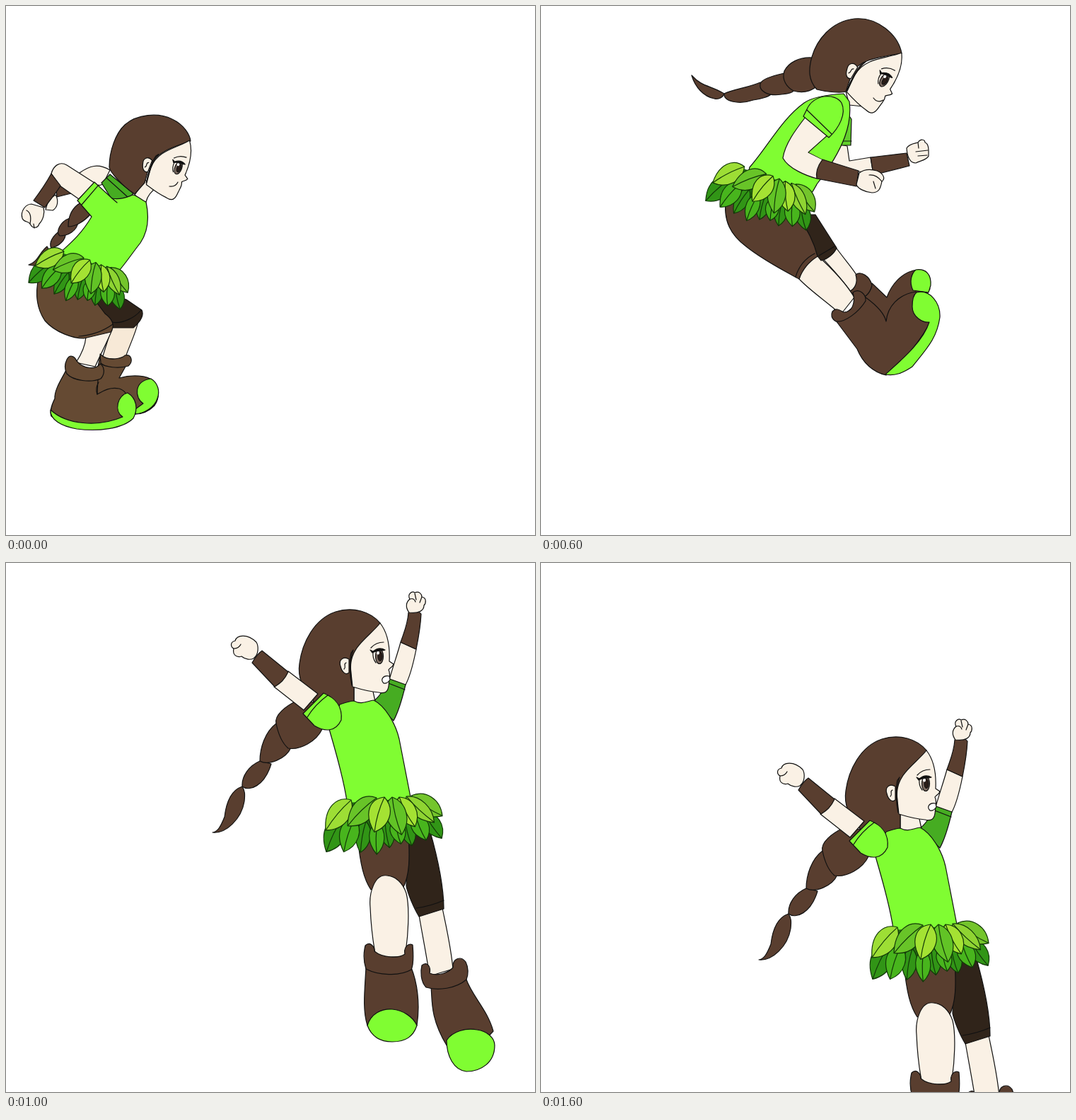
An HTML page without scripts that plays this animation: 748 by 748 pixels, repeating every 1800 ms.

```html
<!DOCTYPE html>
<html lang="en">
<head>
<meta charset="utf-8">
<title>Long jump</title>
<style>
html,body{margin:0;width:100%;height:100%;overflow:hidden;background:#fff}
svg{display:block;width:100%;height:100%;fill:#593e2f;stroke:#111;stroke-width:1.2;stroke-linejoin:round;stroke-linecap:round}
path,ellipse{vector-effect:non-scaling-stroke}
.green{fill:#80fd32}
.shade{fill:#46ac22}
.skin{fill:#faf1e5}
.far{fill:#f7e9d7}
.dark{fill:#30241a}
.tan{fill:#654a33}
.white{fill:#fff}
.line{fill:none}
.pose{visibility:hidden;animation:show 1.8s calc(var(--step)*.2s) step-end infinite}
.fall{visibility:hidden;animation:fall 1.8s 1s step-end infinite}
@keyframes show{0%{visibility:visible}11.111%,100%{visibility:hidden}}
@keyframes fall{
0%{visibility:visible;transform:translate(11px,-73px)}
11.111%{visibility:visible;transform:none}
22.222%{visibility:visible;transform:translate(10px,24px)}
33.333%{visibility:visible;transform:translate(27px,107px)}
44.444%,100%{visibility:hidden}
}
</style>
</head>
<body>
<svg viewBox="0 0 748 748">
<defs>
<g id="face">
<path class="skin" d="M518 158C529 172 532 192 531 212L537 216C536 220 532 221 530 224C533 230 531 234 531 238C530 243 531 249 528 253C526 257 521 257 516 256C503 255 492 252 479 248L476 220C477 190 502 178 518 158Z"/>
<path class="skin" d="M474 209C465 204 459 211 462 219C464 228 470 232 474 228Z"/>
<path class="line" d="M470 214C465 216 471 219 467 223"/>
<path d="M480 196C475 208 476 232 478 246C475 232 474 212 477 200Z"/>
<path class="line" d="M505 193Q512 185 523 185M508 199Q507 208 512 214"/>
<ellipse cx="517" cy="205" rx="5.5" ry="10.5" fill="#7d6c62"/>
<ellipse cx="518" cy="205" rx="3" ry="6.5" fill="#2a1d18"/>
<ellipse class="white" cx="515" cy="200" rx="2" ry="2.5" stroke="none"/>
<path fill="#111" d="M504 196L508 198C514 193 520 193 525 196C520 198 513 196 507 200Z"/>
</g>
<g id="leaf"><path d="M0 0C-20 8-22 30 0 50C19 36 20 12 0 0Z"/><path class="line" d="M0 1Q-4 24 0 49"/></g>
<!-- centred on the origin -->
<g id="skirt" stroke="#123808"><g transform="translate(-522 -442)">
<path fill="#246f12" stroke="none" d="M472 412L570 405L597 445L545 463L512 470L455 462Z"/>
<g fill="#319516">
<use href="#leaf" transform="translate(466 432)rotate(26)scale(1 1.1)"/>
<use href="#leaf" transform="translate(498 438)rotate(10)scale(.7 .9)"/>
<use href="#leaf" transform="translate(525 436)rotate(-9)scale(.7 .8)"/>
<use href="#leaf" transform="translate(553 434)rotate(-14)scale(.7 .8)"/>
<use href="#leaf" transform="translate(580 425)rotate(-34)scale(.8 .9)"/>
</g>
<g fill="#48b51d">
<use href="#leaf" transform="translate(482 434)rotate(18)scale(.9 1)"/>
<use href="#leaf" transform="translate(514 440)rotate(1)scale(.7 .9)"/>
<use href="#leaf" transform="translate(540 436)rotate(-12)scale(.7)"/>
<use href="#leaf" transform="translate(568 428)rotate(-22)scale(.8)"/>
</g>
<use href="#leaf" fill="#9dde35" transform="translate(477 408)rotate(40)scale(1 1.12)"/>
<use href="#leaf" fill="#74c52c" transform="translate(562 402)rotate(-57)scale(.95 1.05)"/>
<use href="#leaf" fill="#8fd432" transform="translate(555 403)rotate(-47)scale(.75 1.08)"/>
<use href="#leaf" fill="#68c428" transform="translate(513 405)rotate(46)scale(1 1.14)"/>
<use href="#leaf" fill="#a4e233" transform="translate(545 404)rotate(-28)scale(.9 .95)"/>
<use href="#leaf" fill="#62c326" transform="translate(535 404)rotate(-14)scale(.95 1.1)"/>
<use href="#leaf" fill="#a4e233" transform="translate(524 404)rotate(16)scale(1 1.03)"/>
</g></g>

<g id="runner">
<path d="M259 124C240 112 228 115 213 98C218 115 230 128 245 131C252 133 258 128 259 124Z"/>
<path d="M310 108C295 115 270 118 259 124C258 135 280 140 300 133C310 132 322 128 325 125Z"/>
<path d="M344 95C330 98 312 103 310 110C308 120 320 128 340 125C350 124 356 122 357 120Z"/>
<path d="M383 73C365 72 350 80 344 92C340 105 348 115 357 120C375 125 385 118 395 110Z"/>
<path class="skin" d="M431 121L441 103L455 142L436 140Z"/>
<path d="M510 67C505 40 475 15 443 18C410 22 390 48 383 72C378 90 378 105 390 118C405 122 425 123 431 121L440 95C450 75 480 72 510 67Z"/>
<use href="#face" transform="translate(486 104)rotate(31)scale(.97)translate(-517 -204)"/>
<path class="line" d="M470 130Q476 138 484 133"/>
<path class="skin" d="M418 195L433 198L436 219L466 214L470 238L440 232L405 220Z"/>
<path fill="#62cf2c" d="M425 140L439 160L438 197L423 197Z"/>
<path class="line" d="M424 191L439 191"/>
<path d="M466 214L517 208L521 226L470 239Z"/>
<path class="skin" d="M517 201C520 195 530 194 533 193C537 187 543 189 543 193C549 195 548 205 548 212C546 218 535 219 530 222C522 222 518 215 517 201Z"/>
<path class="line" d="M533 193L534 201M530 206L547 204M533 212L546 211"/>
<path class="green" d="M372 137C385 128 410 125 428 124L436 135C440 165 430 200 390 252C385 262 380 270 370 280L290 250L295 228C320 200 340 160 372 137Z"/>
<path class="skin" d="M374 157C360 175 345 195 342 215C350 230 375 240 390 244L398 217L378 207L406 182Z"/>
<path class="green" stroke="none" d="M407 182L430 173L398 217L379 207Z"/>
<path d="M398 217L449 233L446 255L390 244C388 234 392 225 398 217Z"/>
<path class="skin" d="M450 236C458 230 468 231 475 233C485 237 487 245 482 248C480 258 478 264 468 264C458 263 447 258 446 252Z"/>
<path class="line" d="M464 239Q474 238 482 248M470 248L473 258"/>
<path class="green" d="M371 156L376 146C385 125 415 122 425 137C432 152 422 172 407 186Z"/>
<path class="line" d="M376 147L411 181"/>
</g>
<use id="runnerSkirt" href="#skirt" transform="translate(313 271)rotate(23)scale(.9)"/>

<g id="shoes" class="tan">
<path d="M133 495L170 508L160 526C178 521 200 522 208 530C218 540 217 555 210 565C200 575 190 577 183 577L120 560Z"/>
<path class="green" d="M205 527C215 533 218 545 214 555C210 568 195 576 183 577L183 570L194 562C182 555 180 530 205 527Z"/>
<path d="M133 492C145 504 165 498 168 494C178 492 180 503 173 509C160 513 140 511 134 505Z"/>
<path d="M86 512C84 520 68 540 69 555C64 565 62 575 64 580C85 594 130 597 165 583C180 570 175 545 160 541C145 538 135 546 129 549L130 528Z"/>
<path class="green" d="M63 571C85 592 130 596 165 581C152 572 158 550 172 547C185 555 187 570 180 583C165 598 130 602 100 598C78 594 62 585 63 571Z"/>
<path class="line" d="M129 549Q126 540 131 532"/>
<path d="M86 500C90 492 97 495 100 502C110 514 128 514 133 506C140 510 140 520 134 527C120 533 95 530 86 520C82 512 83 506 86 500Z"/>
</g>
</defs>

<g class="pose" style="--step:0">
<path class="skin" d="M104 236C118 226 130 222 147 232L137 252L108 262Z"/>
<path d="M70 252L108 252L92 265L72 270Z"/>
<path class="skin" d="M60 274L70 267C75 275 73 285 66 289L56 288Z"/>
<path d="M76 318C66 325 60 335 64 342C75 340 85 330 84 322Z"/>
<path d="M90 300C76 305 70 320 76 325C88 325 100 318 102 306Z"/>
<path d="M100 282C110 272 128 285 119 295C110 305 98 312 88 312C88 298 93 288 100 282Z"/>
<path d="M58 340C62 345 64 352 62 360C55 368 42 368 32 366C45 362 46 350 58 340Z"/>
<path class="shade" d="M147 238L180 265L170 276L150 274L135 250Z"/>
<path class="line" d="M142 243L172 270"/>
<path class="skin" d="M182 267L196 246L214 256C205 262 200 268 198 277C190 275 186 270 182 267Z"/>
<path d="M146 228C146 205 155 180 168 168C185 153 215 150 235 160C252 168 260 182 261 191C240 198 215 205 203 225L196 250L182 266C165 255 147 235 146 228Z"/>
<use href="#face" transform="translate(244 228)rotate(21)scale(.89)translate(-517 -204)"/>
<path class="line" d="M231 255Q240 256 243 249"/>
<path class="skin" d="M64 237C67 226 76 219 86 225L125 250L103 273L76 254Z"/>
<path d="M64 237L77 254C73 262 60 277 55 285L39 275C48 263 56 252 64 237Z"/>
<path class="skin" d="M36 280C28 280 20 290 23 300C25 306 32 304 34 308C38 316 45 314 47 308C53 302 55 292 53 285Z"/>
<path class="line" d="M29 289Q37 293 34 308M39 308L40 314"/>
<path class="green" d="M125 249L150 272C165 275 175 268 180 267C188 270 196 277 198 277C203 300 200 320 190 335C178 350 165 370 153 382L75 365V350C88 338 105 325 121 298L101 275Z"/>
<path class="line" d="M131 253L107 281M150 272L157 278"/>
<path class="far" d="M150 453L187 446C183 465 172 485 168 500L136 498Z"/>
<path class="skin" d="M113 468L150 458C143 475 135 490 126 510L99 504C107 492 112 480 113 468Z"/>
<use href="#shoes"/>
<path class="dark" d="M140 405L170 415L192 430C196 438 188 448 180 455L150 455L120 425Z"/>
<path class="line" d="M150 447C165 450 183 440 191 430"/>
<path class="tan" d="M46 385C40 412 45 430 55 445C70 462 95 470 110 470L148 461C155 452 150 442 140 435L110 395Z"/>
<path class="line" d="M103 467Q130 465 151 450"/>
<use href="#skirt" transform="translate(105 387)rotate(23)scale(.82)"/>
</g>

<g class="pose" style="--step:1">
<path class="far" d="M149 418L176 414C174 440 168 468 166 492L138 490Z"/>
<path class="skin" d="M95 423L130 425C134 450 132 475 128 500L99 496Z"/>
<use href="#shoes" y="-9"/>
<path class="dark" d="M122 335L182 338C188 370 184 400 178 418L142 423Z"/>
<path class="tan" d="M73 325C75 362 82 398 88 425L134 430C146 405 158 375 165 340Z"/>
<path class="line" d="M86 417L138 421M144 414L179 409"/>
<use href="#runner" x="-188" y="47"/>
<use href="#runnerSkirt" x="-188" y="47"/>
</g>

<g class="pose" style="--step:2">
<path d="M134 196C122 206 108 216 90 213C105 222 130 222 138 214C144 205 142 198 134 196Z"/>
<path d="M150 171C142 176 134 185 135 197C145 200 160 195 160 186Z"/>
<path d="M174 136C155 140 148 155 150 172L158 188C172 182 187 170 191 152Z"/>
<path d="M234 82C220 90 213 98 213 106C200 106 175 118 173 136C176 145 182 152 190 157C210 150 230 138 240 122L270 110Z"/>
<path d="M337 38C325 22 300 18 275 24C250 32 235 58 234 82C240 105 265 112 290 108L296 85Z"/>
<path stroke="none" d="M228 92L260 80L270 108L235 118Z"/>
<use href="#face" transform="translate(331 85)rotate(4)scale(.93)translate(-517 -204)"/>
<path class="skin" d="M310 148L370 125L369 133L318 153Z"/>
<path class="shade" d="M294 152L313 146L318 154L294 161Z"/>
<path class="green" d="M240 125C260 112 280 108 295 108L303 150C293 165 300 195 291 222L288 240H218L214 228C214 190 220 155 240 125Z"/>
<path class="skin" d="M297 112Q320 108 343 108L336 76L362 72C370 90 375 110 373 122C350 135 325 142 303 149Z"/>
<path d="M333 32C340 30 347 31 350 33C355 48 360 60 363 70C355 76 345 78 337 77C338 60 336 45 333 32Z"/>
<path class="skin" d="M315 8C318 0 332 1 336 1C345 0 352 12 351 22L350 36L343 29L333 33L318 24C312 20 313 14 315 8Z"/>
<path class="line" d="M336 1C345 10 345 20 343 29M315 11Q321 8 325 12"/>
<path class="green" d="M298 107C270 108 240 112 234 132C234 150 250 160 270 160L305 151Z"/>
<path class="line" d="M291 108L298 153"/>
<path d="M316 312C305 308 305 320 309 327C298 340 293 355 293 365C280 375 280 400 287 410L293 412L312 370Z"/>
<path class="far" d="M324 285L331 262L324 322L313 316Z"/>
<path class="dark" d="M246 321C275 327 310 312 325 288L315 280Z"/>
<path d="M197 285C202 305 220 322 250 322C280 320 310 305 322 290C335 275 335 255 330 240Z"/>
<path class="skin" d="M331 242C350 238 368 242 367 262C362 285 356 305 355 327L324 329C328 295 336 275 331 242Z"/>
<path d="M312 338C300 360 300 375 297 385C290 395 290 408 293 416C330 422 375 405 400 392C405 365 400 355 397 353C380 345 370 352 361 358L363 340Z"/>
<path class="green" d="M293 416C330 420 370 408 399 392C388 385 384 365 396 353C412 350 420 368 418 382C412 408 385 422 350 428C325 431 298 428 293 416Z"/>
<path d="M314 314C320 310 326 318 327 325C337 328 350 326 356 322C354 312 365 308 367 314C370 325 368 335 364 340C348 347 325 347 313 338C308 330 308 320 314 314Z"/>
<use href="#skirt" transform="translate(249 259)scale(.975)"/>
</g>

<g class="pose" style="--step:3">
<path class="skin" d="M390 348L413 336C430 360 445 375 452 390L438 404C425 385 410 370 390 348Z"/>
<path d="M440 405L468 392L489 412C495 395 510 375 533 373L550 400L520 450L470 450Z"/>
<path class="green" d="M530 373C545 371 552 380 551 395L548 405L526 402C520 390 524 378 530 373Z"/>
<path d="M445 380C452 374 465 382 468 395C465 408 455 415 450 412L435 404C445 400 448 390 445 380Z"/>
<path class="skin" d="M365 386L372 360L390 352C410 370 430 390 443 412L424 436C400 415 380 402 365 386Z"/>
<path d="M417 445L459 412C470 420 485 432 488 446C490 425 505 408 530 404L550 448C535 475 515 500 488 522C470 518 455 505 447 485Z"/>
<path class="green" d="M531 405C550 400 565 420 564 440C560 470 545 485 525 510C510 520 500 523 487 521C510 500 540 475 549 447C540 448 525 440 525 425C525 415 527 408 531 405Z"/>
<path d="M412 432C418 425 425 432 428 433C440 433 445 420 441 405C450 398 460 408 459 417C450 432 430 448 417 446C410 442 410 436 412 432Z"/>
<path class="dark" d="M355 295L388 295L418 342C415 350 405 358 396 360L380 340Z"/>
<path d="M262 270C256 305 270 325 290 340C315 360 345 375 365 386Q372 366 391 354C385 330 375 315 360 290Z"/>
<path class="line" d="M360 383Q367 360 387 350M393 353L415 340"/>
<use href="#runner"/>
<use href="#runnerSkirt"/>
</g>

<g class="pose" style="--step:4">
<path class="skin" d="M345 84C355 76 360 82 364 90C372 95 368 104 362 104L350 100Z"/>
<path class="line" d="M350 82L354 90M356 81L358 90"/>
<path class="skin" d="M411 114L430 126L430 139L404 127Z"/>
<path d="M373 99L411 112L406 127L365 105Z"/>
<path d="M419 289C410 300 410 315 417 325C418 340 410 350 398 353C415 353 428 335 430 320C430 305 424 295 419 289Z"/>
<path d="M424 243C410 252 407 275 418 288C428 288 437 270 435 258Z"/>
<path d="M428 212C420 225 420 240 425 256C437 262 448 250 452 228Z"/>
<path d="M424 170C419 190 422 210 429 215C435 225 445 232 452 228C460 220 470 205 467 192Z"/>
<path class="skin" d="M502 130L502 160C510 160 522 158 526 150C520 148 517 142 516 136Z"/>
<path d="M540 41C530 25 505 19 480 25C450 35 432 60 430 90L427 155L450 170L485 165L502 153L498 80Z"/>
<use href="#face" transform="translate(539 90)rotate(1)translate(-517 -204)"/>
<path class="white" d="M552 119C545 117 545 124 548 126C552 127 553 124 552 119Z"/>
<path class="green" d="M476 160L502 154C510 158 520 154 526 151C545 160 560 175 568 195C582 225 588 255 588 290V305H524L520 292C510 255 490 225 468 194Z"/>
<path class="skin" d="M397 123L447 147L430 174L380 147Z"/>
<path d="M354 101C370 108 385 115 397 123C402 121 409 124 411 118C408 128 390 142 380 147C370 138 358 130 345 119Z"/>
<path class="skin" d="M345 85C335 78 322 80 320 90C310 95 314 103 318 105C322 113 335 116 344 114C355 108 352 92 345 85Z"/>
<path class="line" d="M315 97Q322 98 326 92"/>
<path class="green" d="M452 146C470 150 485 165 482 182C478 195 460 196 445 190L428 180Z"/>
<path class="line" d="M457 149Q442 163 435 184"/>
<path class="skin" d="M582 445L609 439C610 465 614 485 619 504L594 508C591 485 586 465 582 445Z"/>
<path d="M606 516L634 510L635 540C650 530 665 520 680 520C695 522 700 526 702 530C715 540 714 560 705 575C690 600 655 628 620 628L610 560Z"/>
<path class="green" d="M683 527C700 520 712 535 712 550C708 575 690 595 670 610C650 622 630 632 613 627C640 620 675 595 695 575L688 560Z"/>
<path d="M618 490C625 486 633 490 634 498C636 510 630 517 620 518L605 518L600 508C610 505 618 500 618 490Z"/>
<path class="skin" d="M551 450L580 448C584 470 590 490 590 514L565 516C558 495 552 475 551 450Z"/>
<path d="M554 527C555 550 560 562 561 575C560 590 568 612 577 628C600 630 645 600 662 577C680 560 670 535 655 530C635 530 615 550 608 562L605 525Z"/>
<path class="green" d="M577 629C610 625 645 600 663 577C655 565 643 545 649 531C665 526 685 535 689 555C688 580 655 605 630 622C610 632 590 640 577 629Z"/>
<path d="M550 508C555 500 563 507 565 514C575 516 590 515 592 508C598 500 606 508 604 518C602 528 590 533 575 533C560 533 550 527 548 520Z"/>
<path class="dark" d="M582 335L611 330C615 380 612 420 609 442L581 447C586 410 587 380 582 335Z"/>
<path d="M514 335C520 385 535 425 551 451L580 450C588 420 590 390 583 335Z"/>
<path class="line" d="M547 443L581 438Q598 436 610 430"/>
<use href="#skirt" transform="translate(548 327)rotate(2)scale(.95)"/>
</g>

<g class="fall">
<path d="M323 389C305 395 300 415 298 432C292 447 288 453 281 454C300 456 322 435 326 410C327 400 327 395 323 389Z"/>
<path d="M348 353C332 360 322 375 323 389C333 397 355 388 364 357Z"/>
<path d="M371 300C355 312 348 335 348 353C360 360 385 350 392 334Z"/>
<path d="M400 268C385 275 368 288 371 300C374 315 380 328 388 335C405 338 428 325 436 308L430 270Z"/>
<path class="skin" d="M547 185L569 195C565 215 560 235 553 247L531 238C536 220 543 200 547 185Z"/>
<path d="M558 143C563 140 572 140 576 145C575 165 572 180 569 195L547 185C552 170 557 160 558 143Z"/>
<path class="skin" d="M559 143C553 135 555 128 560 124C556 117 563 112 567 115C573 112 577 117 577 121C584 122 583 130 580 133C580 140 573 145 559 143Z"/>
<path class="line" d="M560 124Q566 122 568 128M567 116L569 125M577 121L574 129"/>
<path class="shade" d="M529 236L554 245C550 262 543 285 537 296L509 268C517 262 525 250 529 236Z"/>
<path class="line" d="M527 242L553 252"/>
<path class="skin" d="M481 244V278H513L507 250Z"/>
<path d="M518 158C505 142 480 134 455 142C425 152 408 185 404 215C401 235 408 250 425 270L465 280L481 268L481 215Z"/>
<use href="#face"/>
<path class="white" d="M531 233C522 231 518 238 523 243C527 244 530 241 532 238Z"/>
<path class="green" d="M461 273C470 270 478 268 481 268C492 274 500 268 509 267C525 275 540 300 545 322L561 404V425H475L471 410C466 375 455 340 446 308Z"/>
<path class="skin" d="M388 226L430 258L410 281L368 248Z"/>
<path d="M351 197L388 227C383 238 377 243 369 248L337 214C341 207 345 201 351 197Z"/>
<path class="skin" d="M343 185C330 172 315 175 313 183C305 185 307 192 311 194C309 203 315 207 322 205C328 210 335 210 339 208C347 202 346 190 343 185Z"/>
<path class="line" d="M311 194Q318 194 321 188"/>
<path class="green" d="M438 257C455 264 465 275 463 295C455 312 440 312 425 303L409 286Z"/>
<path class="line" d="M444 260Q426 273 415 291"/>
<path class="skin" d="M573 571L606 561C612 590 618 615 621 647L588 657C583 625 578 600 573 571Z"/>
<path d="M590 673L640 662C648 685 670 705 678 735L650 765L612 755C588 715 592 690 590 673Z"/>
<path class="green" d="M612 748C620 735 640 730 655 733C670 735 680 745 680 755C680 780 660 792 640 792C622 790 612 770 612 748Z"/>
<path d="M577 642C585 635 590 645 588 653C600 658 615 652 621 645C620 632 632 628 639 637C643 645 643 655 640 662C625 675 600 678 583 673C575 665 575 650 577 642Z"/>
<path class="dark" d="M557 455L588 450C598 485 608 530 608 562L573 573C565 560 557 540 555 530Z"/>
<path class="line" d="M569 561Q590 558 608 550"/>
<path d="M486 460C490 500 495 520 505 535L550 533C560 515 560 490 558 455Z"/>
<path class="skin" d="M528 515C510 512 502 540 504 560C505 585 508 610 512 630L553 630C558 600 560 560 555 540C550 525 540 516 528 515Z"/>
<path d="M498 645C496 680 493 705 500 727L570 727C575 695 570 665 562 645Z"/>
<path class="green" d="M500 727C505 710 520 703 535 704C550 705 565 715 570 727C565 742 555 750 535 750C515 750 505 740 500 727Z"/>
<path d="M497 614C503 608 510 614 510 622C522 632 545 632 553 626C551 616 558 610 564 613C565 625 566 640 562 648C545 658 515 656 498 647C494 635 495 622 497 614Z"/>
<use href="#skirt" x="522" y="442"/>
</g>
</svg>
</body>
</html>
```
